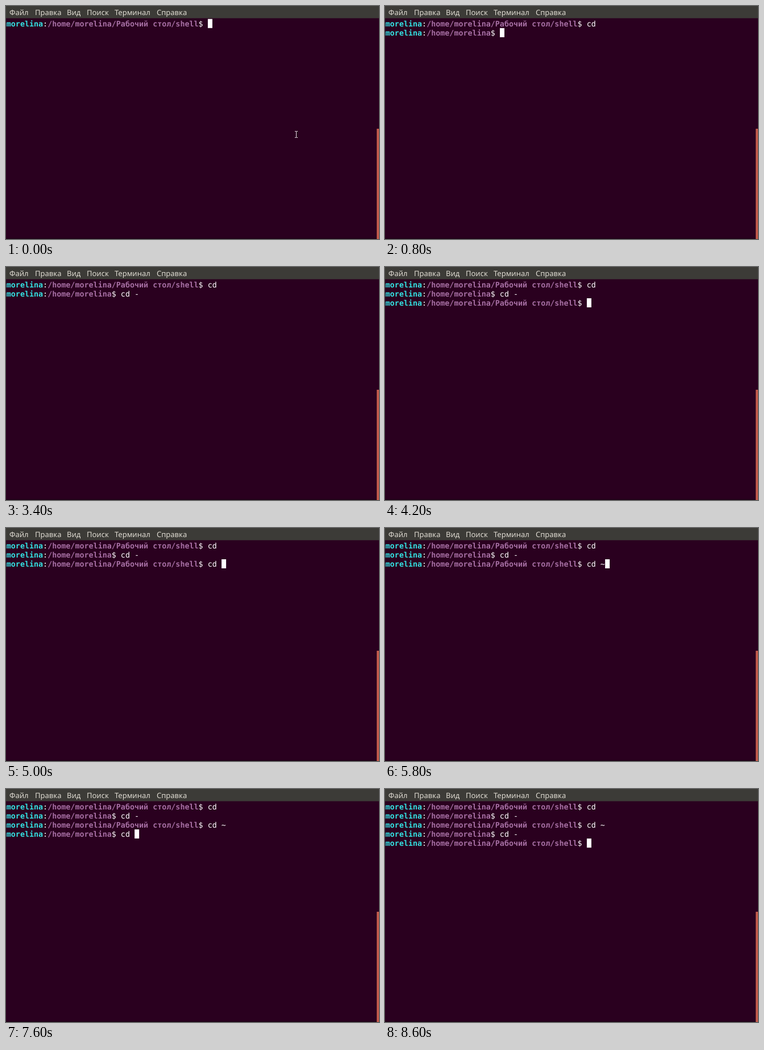
These frames come from a looping animation (656 by 410 pixels, 8700 ms). An HTML page:

```html
<!DOCTYPE html>
<html lang="ru">
<head>
<meta charset="utf-8">
<title>Терминал</title>
<style>
  html, body { margin: 0; width: 100%; height: 100%; overflow: hidden; background: #2a001f; }
  svg { display: block; width: 656px; height: 410px; }
  text { white-space: pre; text-rendering: geometricPrecision; }
  .menu { font: 13px "Noto Sans", "Open Sans", sans-serif; fill: #dfdbd2; }
  .line { font: 13.37px "DejaVu Sans Mono", monospace; fill: #fff; }
  .user, .path { font-weight: bold; }
  .user { fill: #34e2e2; }
  .path { fill: #a66fa3; }
</style>
</head>
<body>
<svg viewBox="0 0 656 410" xmlns="http://www.w3.org/2000/svg">
  <rect width="656" height="410" fill="#2a001f"/>
  <rect width="656" height="21.5" fill="#3c3b37"/>
  <rect y="408.5" width="652" height="1.5" fill="#1c0416"/>
  <rect x="652" y="216" width="4" height="194" fill="#bf5a4b"/>
  <g id="menu"></g>
  <g id="lines"></g>
  <rect id="caret" width="8" height="16" fill="#fff"/>
  <path id="pointer" d="M508 220.5h2l.5 .5l.5 -.5h2M510.5 221v10M508 231.5h2l.5 -.5l.5 .5h2" fill="none" stroke="#e6dfe4"/>
</svg>
<script>
const LOOP = 8700, BLINK = 600;
const CELL = 8.05, ROW = 16.1, LEFT = 0.75;
const USER = "morelina";
const HOME = "/home/" + USER;
const SHELL = HOME + "/Рабочий стол/shell";

// start: when the prompt appears; keys: when each character of the command is typed
const rows = [
  { start: 0, path: SHELL, command: "cd", keys: [200, 400] },
  { start: 700, path: HOME, command: "cd -", keys: [1900, 2100, 2500, 2700] },
  { start: 3700, path: SHELL, command: "cd ~", keys: [4500, 4700, 4900, 5300] },
  { start: 6100, path: HOME, command: "cd -", keys: [7200, 7400, 7600, 7800] },
  { start: 8100, path: SHELL, command: "", keys: [] }
];
const menuItems = [["Файл", 6], ["Правка", 51], ["Вид", 107], ["Поиск", 142], ["Терминал", 191], ["Справка", 265]];

const byId = id => document.getElementById(id);
const caret = byId("caret"), pointer = byId("pointer");

function add(parent, tag, attributes, content = "") {
  const node = document.createElementNS("http://www.w3.org/2000/svg", tag);
  for (const name in attributes) node.setAttribute(name, attributes[name]);
  node.textContent = content;
  return parent.appendChild(node);
}

const show = (node, visible) => node.setAttribute("visibility", visible ? "visible" : "hidden");

for (const [label, x] of menuItems) add(byId("menu"), "text", { class: "menu", x, y: 16 }, label);

rows.forEach((row, i) => {
  row.node = add(byId("lines"), "text", { class: "line", x: LEFT, y: 35.6 + i * ROW });
  add(row.node, "tspan", { class: "user" }, USER);
  add(row.node, "tspan", {}, ":");
  add(row.node, "tspan", { class: "path" }, row.path);
  add(row.node, "tspan", {}, "$ ");
  row.typed = add(row.node, "tspan", {});
});

function render(t) {
  let column = 0, current = 0, lastKey = 0;
  rows.forEach((row, i) => {
    const visible = t >= row.start;
    show(row.node, visible);
    if (!visible) return;
    const count = row.keys.filter(key => key <= t).length;
    row.typed.textContent = row.command.slice(0, count);
    column = USER.length + 1 + row.path.length + 2 + count;
    lastKey = count ? row.keys[count - 1] : row.start;
    current = i;
  });
  caret.setAttribute("x", LEFT + column * CELL);
  caret.setAttribute("y", 22.8 + current * ROW);
  show(caret, (t - lastKey) % (2 * BLINK) < BLINK);
  show(pointer, t < rows[0].keys[0]);
}

const begin = performance.now();
function tick() {
  render((performance.now() - begin) % LOOP);
  requestAnimationFrame(tick);
}
tick();
</script>
</body>
</html>
```
